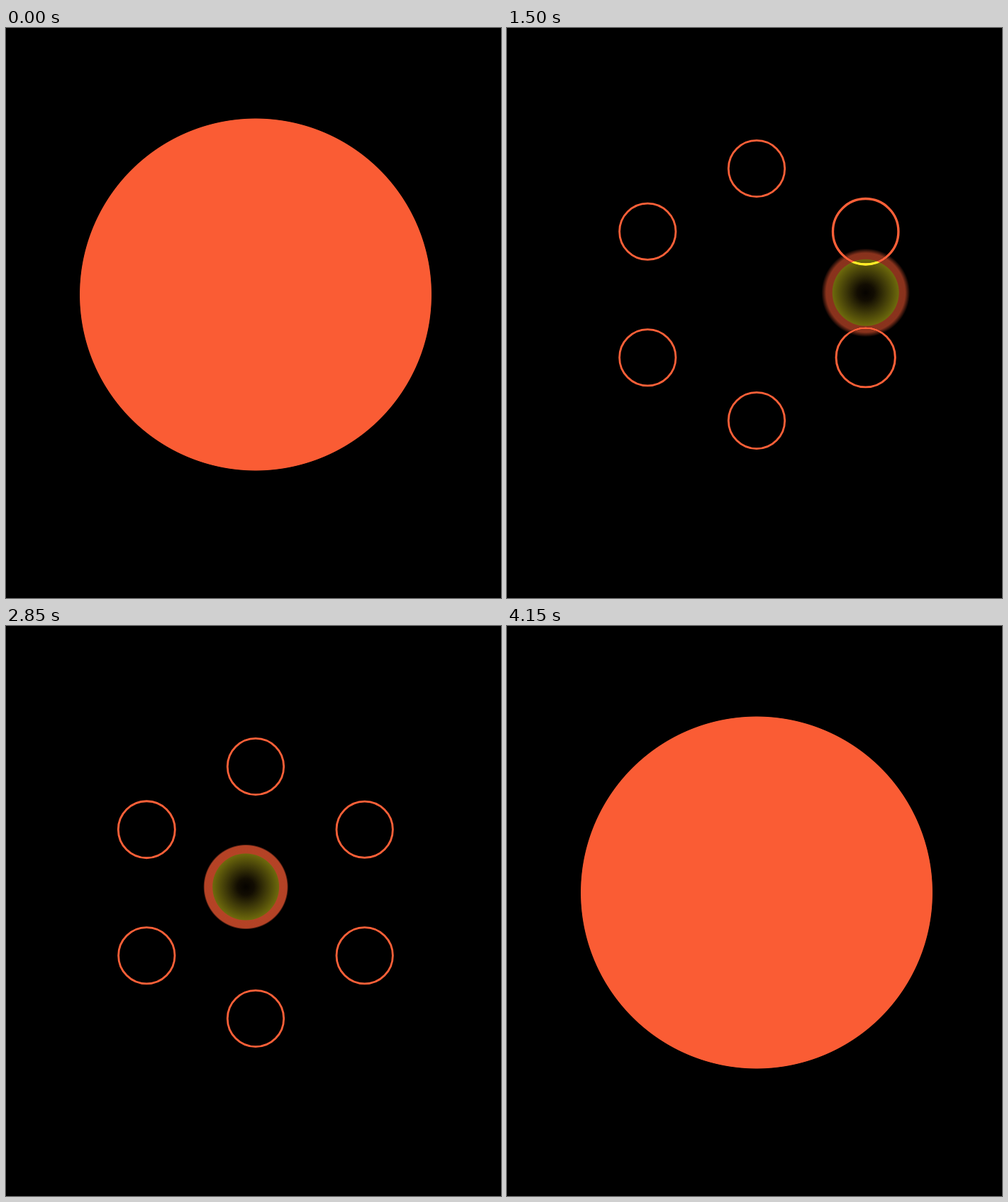
Write an HTML page with a canvas that moves like this. It is 698 by 803 pixels and loops after 4.2 s.

```html
<!DOCTYPE html>
<html lang="en">
<head>
<meta charset="utf-8">
<title>Disc and rings</title>
<style>
html, body { margin: 0; width: 100%; height: 100%; overflow: hidden; background: #000; }
canvas { display: block; }
</style>
</head>
<body>
<canvas id="stage" width="698" height="803"></canvas>
<script>
const W = 698, H = 803, LOOP = 4200, STEP = 50;
const CX = 352, CY = 375.5, ORBIT = 177.5;
const BIG = 248, SMALL = 59, RING = 39.7, EDGE = 297.6;
const SHUTTER = 16, SAMPLES = 16;

const ctx = document.getElementById('stage').getContext('2d');
const layer = document.createElement('canvas');
layer.width = W;
layer.height = H;
const lctx = layer.getContext('2d');

const clamp = (v, a = 0, b = 1) => Math.min(b, Math.max(a, v));
const mix = (a, b, k) => a + (b - a) * k;
const ease = t => t < .5 ? 4 * t ** 3 : 1 - 4 * (1 - t) ** 3;
const span = (t, start, len) => clamp((t - start) / len);

// Keys are [time, value] pairs; smooth uses matched slopes at inner keys.
function track(keys, t, smooth) {
  const n = keys.length - 1;
  if (t <= keys[0][0]) return keys[0][1];
  if (t >= keys[n][0]) return keys[n][1];
  let i = 0;
  while (t > keys[i + 1][0]) i++;
  const [t0, a] = keys[i], [t1, b] = keys[i + 1];
  const len = t1 - t0, k = (t - t0) / len;
  if (!smooth) return mix(a, b, k);
  const slope = j => j < 1 || j >= n ? 0 :
    (keys[j + 1][1] - keys[j - 1][1]) / (keys[j + 1][0] - keys[j - 1][0]);
  const k2 = k * k, k3 = k2 * k;
  return (2 * k3 - 3 * k2 + 1) * a + (k3 - 2 * k2 + k) * len * slope(i)
    + (3 * k2 - 2 * k3) * b + (k3 - k2) * len * slope(i + 1);
}

const travel = [[650, 0], [780, .16], [1000, .854], [1100, 1.16], [1650, 3],
  [2050, 4.48], [2650, 6.52], [2750, 6.77], [2850, 6.91], [2980, 7]];
const rim = [[0, 1], [450, 1], [700, .72], [950, .55], [2700, .55], [2850, .72], [3300, 1]];
const glow = [[500, 0], [750, 1], [2920, 1], [3140, 0]];

const hop = t => track(travel, t, true);

function spot(i, dist) {
  const a = i * Math.PI / 3;
  return [CX + dist * Math.sin(a), CY - dist * Math.cos(a)];
}

function moverAt(t) {
  const p = hop(t), i = Math.min(6, Math.floor(p));
  const node = n => n === 0 || n === 7 ? [CX, CY] : spot(n - 1, ORBIT);
  const [x0, y0] = node(i), [x1, y1] = node(i + 1);
  return [mix(x0, x1, p - i), mix(y0, y1, p - i)];
}

const size = t => ease(span(t, 3080, 810)) + 1 - ease(span(t, 0, 720));
const radius = t => mix(SMALL, BIG, size(t));

function circle(c, x, y, r) {
  c.beginPath();
  c.arc(x, y, r, 0, 2 * Math.PI);
}

function disc(x, y, r, fill) {
  circle(ctx, x, y, r);
  ctx.fillStyle = fill;
  ctx.fill();
}

function drawMover(t) {
  const [x, y] = moverAt(t), r = radius(t), half = SHUTTER / 2;
  const grow = Math.abs(radius(t + half) - radius(t - half));
  const [ax, ay] = moverAt(t - half), [bx, by] = moverAt(t + half);
  const smear = Math.max(.5, .35 * Math.hypot(bx - ax, by - ay));
  const edge = track(rim, t), lit = track(glow, t);
  const outer = r + smear, solid = (r - smear - grow) / outer;

  const g = ctx.createRadialGradient(x, y, 0, x, y, outer);
  for (let i = 0; i <= 10; i++) {
    const k = i / 10;
    const shade = mix(size(t), 1, k ** 2.5);
    g.addColorStop(k * solid, `rgba(250,92,52,${mix(shade, 1, lit) * edge})`);
  }
  g.addColorStop(1, 'rgba(250,92,52,0)');
  disc(x, y, outer, g);

  const inner = r * 47 / SMALL;
  const o = ctx.createRadialGradient(x, y, 0, x, y, inner);
  o.addColorStop(0, 'rgb(6,3,0)');
  o.addColorStop(.25, 'rgb(18,13,2)');
  o.addColorStop(.6, 'rgb(62,57,8)');
  o.addColorStop(1, 'rgb(110,106,12)');
  ctx.globalAlpha = lit;
  disc(x, y, inner, o);
  ctx.globalAlpha = 1;
  return { x, y, inner, lit };
}

// Distance from the centre, in orbits: 0 hidden, 1 in place, 2 gone.
const reach = (i, t) => ease(span(t, i * 62, 257)) + ease(span(t, 3066 + i * 31, 560));

function swell(i, t) {
  const d = hop(t) - (i + 1);
  return Math.exp(-((d / (d < 0 ? .33 : .44)) ** 2));
}

function strokeRing(c, i, t, far, style) {
  const s = swell(i, t), [x, y] = spot(i, far * ORBIT);
  circle(c, x, y, RING * Math.min(1, far) + 22 * s);
  c.lineWidth = 2.8 + 1.8 * s;
  c.strokeStyle = style;
  c.stroke();
}

function drawRings(t, mover) {
  lctx.fillStyle = '#000';
  lctx.fillRect(0, 0, W, H);
  lctx.save();
  circle(lctx, CX, CY, EDGE);
  lctx.clip();
  lctx.globalCompositeOperation = 'lighter';
  for (let i = 0; i < 6; i++) {
    if (reach(i, t) === 0) continue;
    const a = reach(i, t - SHUTTER / 2), b = reach(i, t + SHUTTER / 2);
    const n = Math.abs(b - a) < .002 ? 1 : SAMPLES;
    const style = `rgb(${255 / n},${96 / n},${56 / n})`;
    for (let k = 0; k < n; k++) strokeRing(lctx, i, t, mix(a, b, (k + .5) / n), style);
  }
  lctx.restore();
  ctx.globalCompositeOperation = 'lighten';
  ctx.drawImage(layer, 0, 0);
  ctx.globalCompositeOperation = 'source-over';

  // Rings turn yellow where they cross the olive core.
  if (mover.lit === 0) return;
  ctx.save();
  circle(ctx, mover.x, mover.y, mover.inner);
  ctx.clip();
  for (let i = 0; i < 6; i++) {
    if (reach(i, t) === 1) strokeRing(ctx, i, t, 1, `rgba(255,240,38,${mover.lit})`);
  }
  ctx.restore();
}

function draw(t) {
  ctx.fillStyle = '#000';
  ctx.fillRect(0, 0, W, H);
  drawRings(t, drawMover(t));
}

const begin = performance.now();
function tick() {
  const t = (performance.now() - begin) % LOOP;
  draw(Math.floor(t / STEP) * STEP);
  requestAnimationFrame(tick);
}
tick();
</script>
</body>
</html>
```
